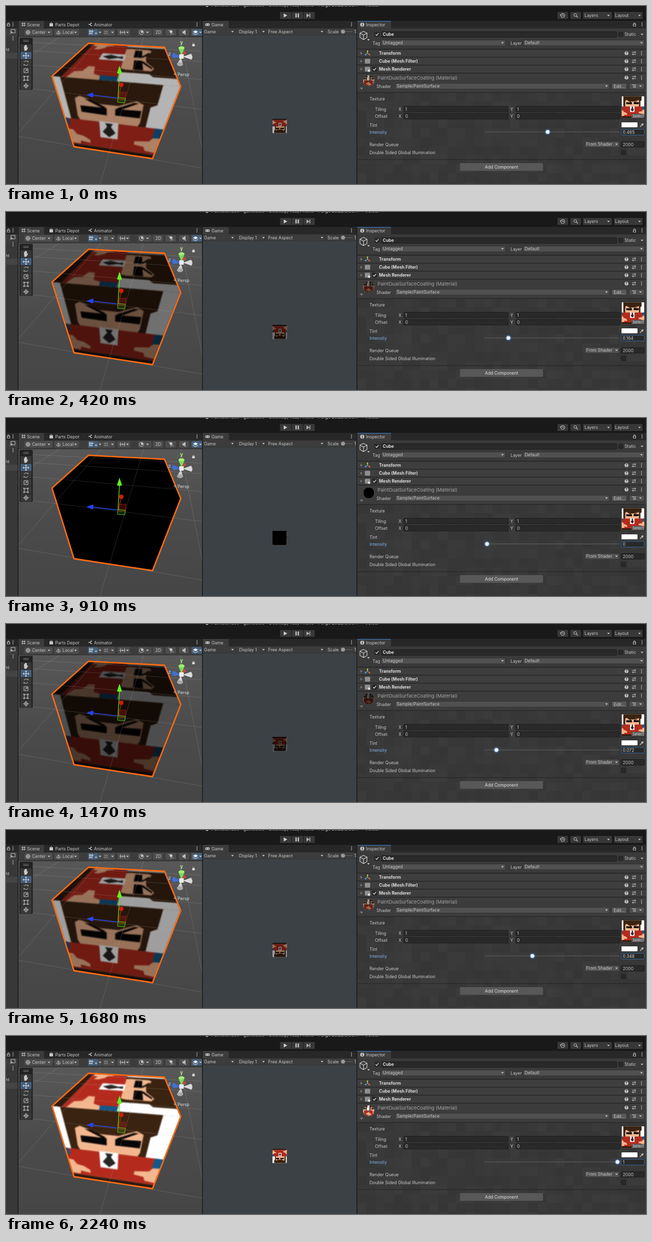
Animation, 1280 px wide and 358 px high, one loop 2.52 s. Source, as an HTML page:

```html
<!DOCTYPE html>
<html lang="en">
<head>
<meta charset="utf-8">
<title>Intensity slider</title>
<style>
  html, body { margin: 0; width: 100%; height: 100%; overflow: hidden; background: #191919; }
  svg { display: block; width: 100vw; height: 100vh; font: 8.65px Inter, "Liberation Sans", sans-serif; }
  text { white-space: pre; }
</style>
</head>
<body>
<svg id="stage" viewBox="0 0 1280 358" preserveAspectRatio="none"></svg>
<script>
const LIGHT = '#c8c8c8', FIELD = '#292929', BUTTON = '#505050', BLUE = '#46607c', EDGE = '#1b1b1b';
const stage = document.getElementById('stage');
const parts = [];
const add = (...markup) => parts.push(...markup);

const rect = (x, y, w, h, fill, extra = '') =>
  add(`<rect x="${x}" y="${y}" width="${w}" height="${h}" fill="${fill}" ${extra}/>`);
const box = (x, y, w, h, fill, stroke = EDGE) =>
  rect(x + .5, y + .5, w - 1, h - 1, fill, `rx="1.5" stroke="${stroke}" stroke-width=".8"`);
const path = (d, stroke = LIGHT, width = 1, fill = 'none', extra = '') =>
  add(`<path d="${d}" fill="${fill}" stroke="${stroke}" stroke-width="${width}" ${extra}/>`);
const shape = (d, fill, extra = '') => path(d, 'none', 0, fill, extra);
const circle = (x, y, r, fill, extra = '') =>
  add(`<circle cx="${x}" cy="${y}" r="${r}" fill="${fill}" ${extra}/>`);
const text = (x, y, str, extra = '', fill = LIGHT) =>
  add(`<text x="${x}" y="${y}" fill="${fill}" ${extra}>${str}</text>`);
const bold = (x, y, str) => text(x, y, str, 'font-weight="700"', '#dedede');

const caret = (x, y) => shape(`M${x - 2.7} ${y - 1.3}h5.4l-2.7 3z`, LIGHT);
const fold = (x, y) => shape(`M${x - 2} ${y - 3}v6l4-3z`, '#777');
const dots = (x, y) => [-3, 0, 3].forEach(d => circle(x, y + d, .9, LIGHT));
const lock = (x, y) => {
  rect(x - 2.5, y - .5, 5, 3.8, 'none', `stroke="${LIGHT}"`);
  path(`M${x - 1.5} ${y - 1}v-1.4q1.5-2.2 3 0v1.4`);
};
const tick = (x, y, on = true) => {
  box(x - 5, y - 5, 10, 10, FIELD);
  if (on) path(`M${x - 2.7} ${y}l2 2.3l4-5`, '#e4e4e4', 1.3);
};
const tools = y => {
  circle(1241, y, 3.8, LIGHT);
  text(1241, y + 2.6, '?', 'text-anchor="middle" font-size="7" font-weight="700"', '#333');
  path(`M1252 ${y - 2}h8m-2-2v4M1252 ${y + 2}h8m-6-2v4`);
  dots(1271, y);
};
const dropdown = (x, y, w, label) => {
  box(x, y, w, 12.5, BUTTON, '#303030');
  text(x + 3.5, y + 9.4, label);
  caret(x + w - 6, y + 6);
};
const field = (x, y, w, value) => {
  box(x, y, w, 12.5, FIELD);
  text(x + 3.5, y + 9.6, value);
};

// Maps texture coordinates (0..100) into a quad given as TL, TR, BR, BL.
function projector([[x0, y0], [x1, y1], [x2, y2], [x3, y3]]) {
  const ax = x1 - x2, ay = y1 - y2, bx = x3 - x2, by = y3 - y2;
  const sx = x0 - x1 + x2 - x3, sy = y0 - y1 + y2 - y3, den = ax * by - bx * ay;
  const g = (sx * by - bx * sy) / den, h = (ax * sy - sx * ay) / den;
  return (u, v) => {
    u /= 100; v /= 100;
    const w = 1 + g * u + h * v;
    return [(x0 + (x1 - x0 + g * x1) * u + (x3 - x0 + h * x3) * v) / w,
            (y0 + (y1 - y0 + g * y1) * u + (y3 - y0 + h * y3) * v) / w];
  };
}

const SKIN = '#f3b78f', INK = '#080605';
const texture = [
  ['#fff', '0,0 100,0 100,100 0,100'],
  ['#3b2311', '7,0 88,0 88,19 83,22 83,48 7,48'],
  [SKIN, '16,20 21,17 30,20 38,24 56,24 64,20 71,17 77,20 77,42 75,48 17,48 15,42'],
  [INK, '20,28 45,28 45,37 20,36'],
  [INK, '25,20 30,20 44,27 42,29'],
  [INK, '53,28 76,27 76,36 53,36'],
  [INK, '54,27 69,19 73,19 57,29'],
  ['#b42b1d', '0,47 100,47 100,92 0,92'],
  ['#12598a', '0,47 4,47 4,57 0,57'],
  ['#12598a', '92,47 100,47 100,64 92,62'],
  ['#fff', '37,46 56.5,46 56.5,72 37,72'],
  ['#292524', '43,48 51,48 49,53 54,62 47,70 40,62 45,53'],
  [SKIN, '0,64 6,65 9,72 17,74 24,80 24,86 12,84 11,90 0,90'],
  [SKIN, '100,61 93,62 90,68 75,71 75,77 86,79 88,86 100,88'],
  ['#2f1a0d', '0,92 100,92 100,100 0,100']
];
function textured(quad) {
  const project = projector(quad);
  for (const [fill, points] of texture) {
    const mapped = points.split(' ').map(p => project(...p.split(',').map(Number)).map(n => n.toFixed(2)));
    add(`<polygon points="${mapped.join(' ')}" fill="${fill}"/>`);
  }
}
const square = (x, y, w, h) => [[x, y], [x + w, y], [x + w, y + h], [x, y + h]];
const turned = (x, y, w, h) => [[x + w, y + h], [x, y + h], [x, y], [x + w, y]];

function topBar() {
  rect(0, 0, 1280, 358, '#191919');
  text(411, 1.2, 'Paintsurface - gameside - Desktop, Tab, Phone - Forge 2022.3.55f1* &lt;Vulca&gt;',
    'font-weight="600" font-size="9"', '#aaa');
  circle(402, -1, 3, '#aaa');
  [548, 571.5, 595].forEach(x => rect(x, 12, 22.5, 14, '#383838', 'rx="1"'));
  shape('M555.500 15v8l7-4z', '#d0d0d0');
  shape('M579 15h2.300v8h-2.300zM583.500 15h2.300v8h-2.300z', '#d0d0d0');
  shape('M601 15v8l6-4zM607 15h1.500v8h-1.500z', '#b0b0b0');
  [[1103, 21], [1129, 21], [1154, 58], [1216, 57]].forEach(([x, w]) => rect(x, 12, w, 14, '#383838', 'rx="1.5"'));
  circle(1113.5, 19, 4, 'none', `stroke="${LIGHT}"`);
  path('M1113.500 16.500v2.800h2.300M1108 17l1.500 2l2-1.500');
  circle(1138.5, 18, 2.8, 'none', `stroke="${LIGHT}"`);
  path('M1140.500 20l3 3', LIGHT, 1.3);
  text(1157, 22, 'Layers'); caret(1205, 19);
  text(1218, 22, 'Layout'); caret(1267, 19);
}

function hierarchy() {
  rect(0, 30, 23.5, 328, '#383838');
  rect(0, 30, 23.5, 15, '#282828');
  rect(0, 45, 23.5, 17, '#3c3c3c');
  rect(0, 94, 23.5, 12, '#444');
  lock(5, 37); dots(14, 37); dots(14, 65);
  rect(10, 47, 8, 7, 'none', `stroke="${LIGHT}"`);
  path('M8 56l4-4M12 55v-3h-3');
  text(-1, 91, 'ht');
}

function sceneBars() {
  rect(25, 30, 367, 15, '#282828');
  rect(25, 30, 51, 15, '#3c3c3c');
  path('M33 33v8M37 33v8M31 35h8M31 39h8');
  text(42, 40.5, 'Scene');
  rect(87, 35, 7, 6, LIGHT); path('M88.500 35q2-4 4 0');
  text(98.5, 40.5, 'Parts Depot');
  path('M165 37h3l2-2.500h2M168 37l2 2.500h2', LIGHT, 1.3);
  text(176, 40.5, 'Animator');
  dots(382, 37);
  rect(25, 45, 367, 17.5, '#3c3c3c');
  [[37, 56], [97, 49], [193, 25], [223, 25], [264, 27], [294, 20], [319, 21], [346, 20]]
    .forEach(([x, w]) => rect(x, 46.5, w, 13, '#4d4d4d', 'rx="1.5"'));
  [[164, 20], [371, 21]].forEach(([x, w]) => rect(x, 46.5, w, 13, BLUE, 'rx="1.5"'));
  rect(184.5, 46.5, 7, 13, '#4d4d4d');
  path('M41 50h6v6h-6zM44 48v10M39 53h10');
  text(52, 56, 'Center'); caret(86, 53);
  path('M101 55l4-5l4 5l-4 2zM105 50v7');
  text(113, 56, 'Local'); caret(139, 53);
  path('M168 48v9M172 48v9M166 51h9M166 55h6', '#eee'); caret(180, 55); caret(188, 53);
  path('M198 49v8M202 49v8M196 51h8M196 55h8', '#888'); caret(213, 53);
  path('M227 53h12M229 49v8M233 51v4M237 49v8'); caret(243, 53);
  circle(271, 53, 4.2, 'none', `stroke="${LIGHT}"`); circle(272, 52, 2.2, LIGHT); caret(283, 53);
  text(299, 56, '2D');
  circle(330, 51.5, 2.8, LIGHT); path('M330 54v4M325 48l10 9');
  shape('M353 51h2l4-3v10l-4-3h-2z', LIGHT); path('M352 48l8 10', '#888');
  shape('M374 52l5-3l5 3l-5 3z', '#eee'); path('M374 55l5 3l5-3', '#eee'); caret(389, 53);
}

function gridLines() {
  const across = [[72, 91], [88, 112], [116, 148], [163, 208], [262, 326]];
  const down = [[107, 63, 25, 113], [190, 63, 25, 255], [275, 63, 188, 358], [349, 63, 392, 285]];
  for (const [a, b] of across) path(`M25 ${a}L392 ${b}`, '#b5b5b5', .7, 'none', 'opacity=".3"');
  for (const [a, b, c, d] of down) path(`M${a} ${b}L${c} ${d}`, '#b5b5b5', .7, 'none', 'opacity=".32"');
}

function sceneView() {
  const outline = 'M165 75L317 83L349.500 162L293 307L136 283L92 141Z';
  add('<g clip-path="url(#sceneClip)">');
  rect(25, 62.5, 367, 296, 'url(#sky)');
  add(`<clipPath id="cubeClip"><path d="${outline}"/></clipPath>`);
  add('<g clip-path="url(#cubeClip)"><g filter="url(#soft)">');
  textured([[317, 83], [349, 162], [92, 141], [165, 75]]);
  textured([[92, 141], [349, 162], [293, 307], [136, 283]]);
  add('</g></g>');
  shape(outline, '#000', 'class="shade"');
  gridLines();
  path(outline, '#ff6b12', 2.8, 'none', 'stroke-linejoin="round"');

  path('M224 185L227 135', '#55e512', 1.4);
  shape('M227 120l-5 15q5 3 10 0z', '#62f01c');
  path('M224 185L172 179', '#2b4bf0', 1.4);
  shape('M161 178.500l13-4.500q2 5-1 10z', '#2444ee');
  path('M225 184L230.500 160', '#d41c0c', 1.3);
  circle(230.5, 158.5, 4.5, '#d61b0c');
  path('M227 174l13-1l-1 14l-13 1z', '#a3150b', 1, '#c0201044');
  path('M224 184l15 1.500l-1.500 9.500l-14.500-1.500z', '#52c51a', 1, '#48b01a33');
  add('</g>');

  shape('M351 102l5-12l5 4z', '#c9463b');
  shape('M351 100l-6-15q6-8 12 0z', '#7ed957');
  add('<ellipse cx="351" cy="84" rx="6" ry="3" fill="#a1ef75"/>');
  shape('M349 102l-13 3q-7-5-1-11z', '#3f70d6');
  shape('M354 102l16-6q5 6 1 12z', '#d9d9d9');
  shape('M350 104l-8 13q7 6 12 1z', '#d4d4d4');
  add('<ellipse cx="348" cy="117" rx="6" ry="4" fill="#a9a9a9"/>');
  rect(346.5, 97, 9, 9, '#ededed', 'rx="1"');
  text(351, 77, 'y', 'text-anchor="middle" font-weight="700" font-size="10"', '#a5ec7d');
  text(327, 100, 'z', 'text-anchor="middle" font-weight="700" font-size="10"', '#86a9ff');
  rect(372.5, 77, 5, 4, '#ddd'); path('M373.500 77v-1q1.500-2 3 0v1', '#ddd');
  path('M340 134l-5 3l5 3M337 137h4', '#aaa', .8);
  text(343, 140.5, 'Persp', '', '#ddd');

  rect(27, 64, 26.5, 104.5, '#222', 'rx="2"');
  path('M34.500 69h11M34.500 71.500h11', '#888', .9);
  for (let i = 0; i < 6; i++) rect(29, 77 + i * 15.25, 22, 14.5, i === 1 ? BLUE : '#383838');
  shape('M36 84v-3h1.300v2v-4h1.500v4v-5h1.500v5v-4h1.500v5l2-1v2l-3 5h-4z', LIGHT);
  path('M40 94.500v11M34.500 100h11M38 96l2-2l2 2M38 104l2 2l2-2M36 98l-2 2l2 2M44 98l2 2l-2 2', '#eee');
  path('M36 113a4.500 4.500 0 0 1 8 0v-3M44 117a4.500 4.500 0 0 1-8 0v3');
  path('M36 126h8v8h-8zM38 132l4-4M39.500 128h2.500v2.500');
  path('M36.500 142h7v7h-7z');
  [[36, 141.5], [44, 141.5], [36, 149.5], [44, 149.5]].forEach(([x, y]) => circle(x, y, 1.3, LIGHT));
  circle(40, 160.5, 3.4, 'none', `stroke="${LIGHT}"`);
  path('M40 155v11M34.500 160.500h11');
}

function gameView() {
  rect(393.5, 30, 307.5, 15, '#282828');
  rect(393.5, 30, 52, 15, '#3c3c3c');
  rect(398.5, 35, 9, 5, LIGHT, 'rx="2.5"'); circle(401, 37.5, 1, '#333'); circle(405, 37.5, 1, '#333');
  text(411, 40.5, 'Game'); dots(691, 37);
  rect(393.5, 45, 307.5, 13.5, '#3c3c3c');
  text(396, 54.5, 'Game'); caret(453, 51.5);
  text(466, 54.5, 'Display 1'); caret(515, 51.5);
  text(524.5, 54.5, 'Free Aspect'); caret(632, 51.5);
  text(643, 54.5, 'Scale');
  rect(670, 51, 23, 1, '#666'); circle(674, 51.5, 4, '#999');
  text(696.5, 54.5, '1');
  [459, 518, 637].forEach(x => rect(x, 46, 1, 12, '#303030'));
  rect(393.5, 58.5, 307.5, 299.5, '#3b4145');
  textured(turned(533, 227, 28.5, 28.5));
  rect(533, 227, 28.5, 28.5, '#000', 'class="shade"');
}

function inspectorBackground() {
  rect(702.5, 30, 577.5, 328, '#373737');
  let seed = 7;
  const random = () => (seed = seed * 16807 % 2147483647) / 2147483647;
  for (let y = 174; y < 358; y += 18)
    for (let x = 703; x < 1280; x += 18)
      rect(x, y, 18, 18, random() < .5 ? '#000' : '#fff', `opacity="${(random() * .022).toFixed(3)}"`);
}

function inspectorHeader() {
  rect(702.5, 30, 577.5, 15, '#282828');
  rect(702.5, 30, 67.5, 15, '#3c3c3c');
  rect(702.5, 30, 67.5, 1.2, '#3a79bb');
  circle(712.5, 37.5, 4, LIGHT); rect(711.8, 36.5, 1.5, 3.8, '#333'); rect(711.8, 34.6, 1.5, 1.2, '#333');
  text(720, 40.5, 'Inspector'); lock(1257, 37); dots(1272, 37);
  rect(702.5, 45, 577.5, 41, '#3a3a3a');
  path('M715 51l7 3.500v9l-7 4l-7-4v-9zM708 54.500l7 4l7-4M715 58.500v9', '#d0d0d0', 1.2);
  caret(725, 68);
  tick(742, 57);
  box(750, 51, 472, 12.5, FIELD); bold(753.5, 60.3, 'Cube');
  tick(1229.5, 57, false); text(1237, 60.3, 'Static'); caret(1272, 57);
  text(733, 77.5, 'Tag'); dropdown(750, 68, 249, 'Untagged');
  text(1009, 77.5, 'Layer'); dropdown(1034, 68, 243, 'Default');
  ['Transform', 'Cube (Mesh Filter)', 'Mesh Renderer'].forEach((name, i) => {
    const y = 95 + i * 16;
    rect(702.5, y - 8, 577.5, 16, '#3e3e3e');
    rect(702.5, y - 8.5, 577.5, 1, EDGE);
    fold(711, y); bold(746, y + 3.2, name); tools(y);
  });
  path('M723 95v-4', '#8fd14f', 1.5); path('M723 95l-4 3', '#55a8e8', 1.5); path('M723 95l4 3', '#e86a45', 1.5);
  circle(723, 91, 1.4, '#d4c84c'); circle(719, 98, 1.4, '#55a8e8'); circle(727, 98, 1.4, '#e86a45');
  for (const y of [111, 127])
    path(`M718.500 ${y - 4}h9v8h-9zM721.500 ${y - 4}v8M724.500 ${y - 4}v8M718.500 ${y - 1.3}h9M718.500 ${y + 1.3}h9`);
  circle(726, 130, 2.5, '#ddd');
  tick(737, 127);
}

function materialPanel() {
  rect(702.5, 135, 577.5, 38, '#3c3c3c');
  rect(702.5, 134.5, 577.5, 1, EDGE);
  // The texture's seam runs down the middle of the preview ball.
  add('<g clip-path="url(#ball)">');
  textured(square(703.5, 139, 22, 23));
  textured(square(725.5, 139, 22, 23));
  rect(713, 138, 25, 25, '#000', 'class="shade"');
  add('</g>');
  text(743, 148, 'PaintDualSurfaceCoating (Material)', 'font-size="9.600"', '#a5a5a5');
  tools(144);
  shape('M707.500 164h7l-3.500 4.500z', '#777');
  text(741, 164.5, 'Shader'); dropdown(778, 155, 429, 'Sample/PaintSurface');
  box(1211, 155, 31, 12.5, '#585858', '#303030'); text(1215.5, 164.5, 'Edit...');
  box(1246, 155, 31, 12.5, BUTTON, '#303030');
  path('M1252 158.500h8M1254 161h6M1254 163.500h6'); caret(1269, 161);
  rect(702.5, 173.5, 577.5, 1, '#222');

  text(727, 190, 'Texture');
  [['Tiling', 201, 1], ['Offset', 215.5, 0]].forEach(([name, y, value]) => {
    text(738, y + 9.6, name);
    text(785, y + 9.6, 'X'); field(795, y, 210, value);
    text(1008.5, y + 9.6, 'Y'); field(1018.5, y, 210, value);
  });
  rect(1230.5, 180.5, 47, 46, EDGE);
  textured(square(1231.5, 181.5, 45, 44));
  rect(1251, 217, 25.5, 8.5, '#555');
  text(1253, 224, 'Select', 'font-size="7.600"', '#ddd');

  text(727, 242.5, 'Tint');
  box(1230, 233, 34, 12, '#fff');
  path('M1268 243l4-4', LIGHT, 1.4); path('M1271 237l3 3M1272.500 238.500l2-2', LIGHT, 2);
  text(727, 257, 'Intensity', '', '#7fb2f0');
  rect(958, 252.7, 269, 1.2, '#5e5e5e');
  add('<g id="knob"><circle r="6" fill="#3a79bb" opacity=".7"/><circle r="3.800" fill="#f2f2f2"/></g>');
  box(1230, 247.5, 47, 12.5, FIELD, '#3a79bb');
  add(`<text id="value" x="1233.500" y="257" fill="#d2d2d2"></text>`);

  text(727, 282, 'Render Queue'); dropdown(1157, 272, 70, 'From Shader'); field(1230, 272, 47, '2000');
  text(727, 297.5, 'Double Sided Global Illumination'); tick(1235, 294.5, false);
  rect(702.5, 308.5, 577.5, 1, '#222');
  rect(908, 316, 166, 15.5, '#585858', 'rx="1.5"');
  text(991, 327, 'Add Component', 'text-anchor="middle"', '#e4e4e4');
}

add(`<defs>
  <linearGradient id="sky" x1="0" y1="0" x2="0" y2="1"><stop stop-color="#585858"/><stop offset=".5" stop-color="#4b4b4b"/><stop offset="1" stop-color="#464646"/></linearGradient>
  <filter id="soft" color-interpolation-filters="sRGB"><feGaussianBlur stdDeviation=".8"/></filter>
  <clipPath id="sceneClip"><rect x="25" y="62.500" width="367" height="295.500"/></clipPath>
  <clipPath id="ball"><circle cx="725.500" cy="150.500" r="11"/></clipPath>
</defs>`);
topBar();
hierarchy();
sceneBars();
sceneView();
gameView();
inspectorBackground();
inspectorHeader();
materialPanel();
stage.innerHTML = parts.join('');

const LOOP = 2520, STEP = 70;
const keys = [[0, .465], [420, .164], [560, .085], [910, 0], [1400, 0],
  [1470, .072], [1680, .348], [1960, .73], [2240, 1], [LOOP, 1]];
const knob = document.getElementById('knob');
const valueText = document.getElementById('value');
const shades = stage.querySelectorAll('.shade');

function intensityAt(time) {
  const next = keys.findIndex(([t]) => t > time);
  const [t0, v0] = keys[next - 1], [t1, v1] = keys[next];
  return v0 + (v1 - v0) * (time - t0) / (t1 - t0);
}

function render(time) {
  const value = intensityAt(Math.floor(time % LOOP / STEP) * STEP);
  knob.setAttribute('transform', `translate(${962 + 261 * value} 253.300)`);
  valueText.textContent = Number(value.toFixed(3));
  // Linear light shown in display gamma.
  const dark = 1 - value ** (1 / 2.2);
  shades.forEach(s => s.setAttribute('opacity', dark));
}

const start = performance.now();
function loop() {
  render(performance.now() - start);
  requestAnimationFrame(loop);
}
loop();
</script>
</body>
</html>
```
